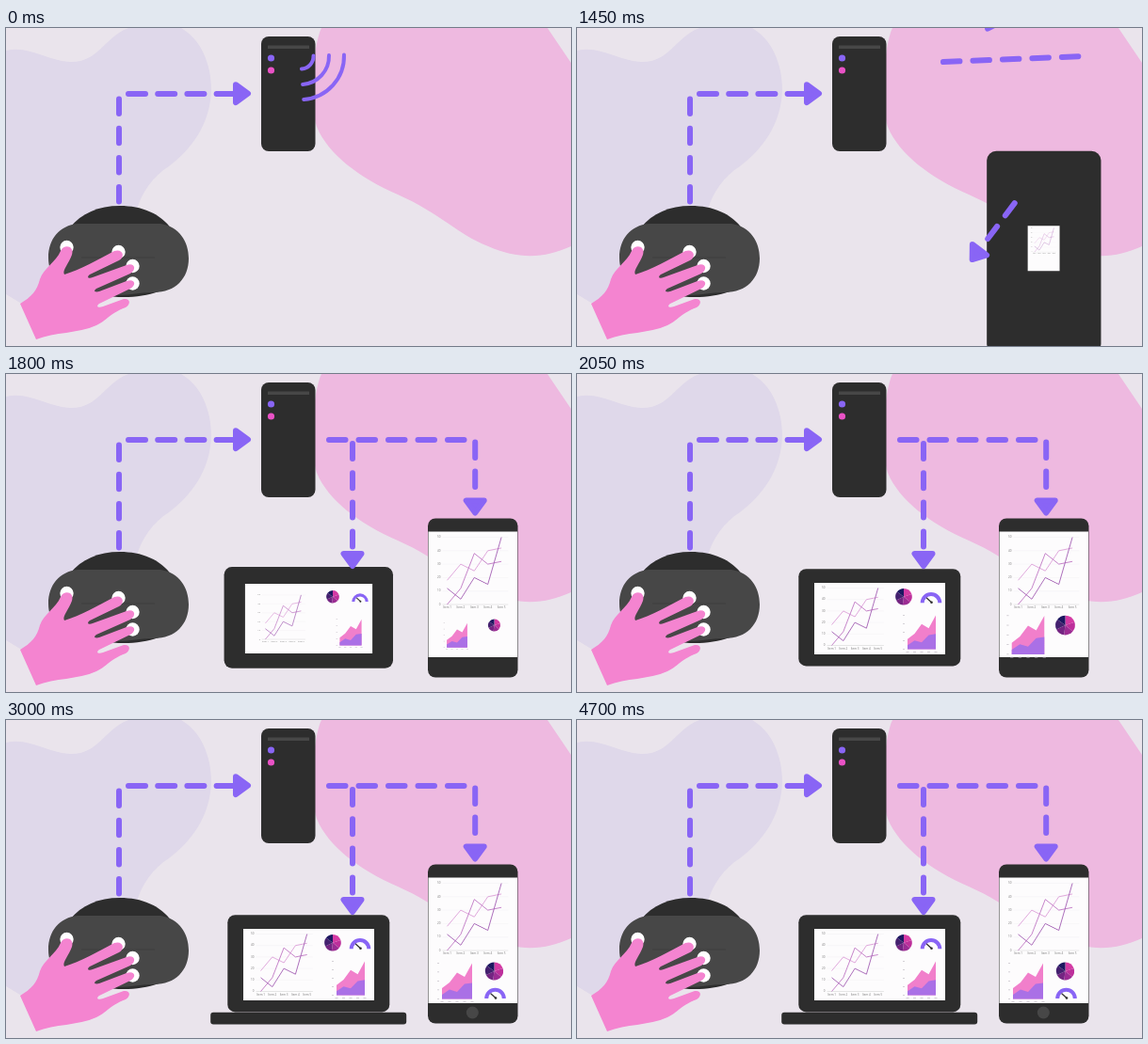
An HTML page with a canvas that plays this animation: 600x338 px, repeating every 4800 ms.

```html
<!DOCTYPE html>
<html lang="en">
<head>
<meta charset="utf-8">
<title>Device data flow</title>
<style>
html, body { margin: 0; width: 100%; height: 100%; overflow: hidden; background: #eae4ec; }
canvas { display: block; width: 600px; height: 338px; }
</style>
</head>
<body>
<canvas id="stage"></canvas>
<script>
const W = 600, H = 338, LOOP = 4800, STEP = 50;
const DARK = '#2d2d2d', GREY = '#474747', PURPLE = '#8965f5', PINK = '#f484d0', WHITE = '#fdfcfd';
const canvas = document.getElementById('stage');
const ctx = canvas.getContext('2d');
const dpr = window.devicePixelRatio || 1;
canvas.width = W * dpr;
canvas.height = H * dpr;

const clamp = v => Math.max(0, Math.min(1, v));
const span = (t, start, length) => clamp((t - start) / length);

// Grows without overshoot.
const grow = (t, start) => 1 - (1 - span(t, start, 385)) ** 3;

// Grows past full size, then settles.
function pop(t, start) {
  if (t < start + 200) return 1.27 * (1 - (1 - span(t, start, 200)) ** 2);
  return 1 + 0.27 * (1 - span(t, start + 200, 250)) ** 2;
}

function fillPath(d, color) {
  ctx.fillStyle = color;
  ctx.fill(new Path2D(d));
}

function box(x, y, w, h, r, color) {
  ctx.beginPath();
  ctx.roundRect(x, y, w, h, r);
  ctx.fillStyle = color;
  ctx.fill();
}

function disc(x, y, r, color) {
  ctx.beginPath();
  ctx.arc(x, y, r, 0, Math.PI * 2);
  ctx.fillStyle = color;
  ctx.fill();
}

function scaled(s, x, y, draw) {
  if (s <= 0) return;
  ctx.save();
  ctx.translate(x, y);
  ctx.scale(s, s);
  ctx.translate(-x, -y);
  draw();
  ctx.restore();
}

function dashes(x1, y1, x2, y2, on, off) {
  ctx.save();
  ctx.strokeStyle = PURPLE;
  ctx.lineWidth = 6;
  ctx.lineCap = 'round';
  ctx.setLineDash([on, off]);
  ctx.beginPath();
  ctx.moveTo(x1, y1);
  ctx.lineTo(x2, y2);
  ctx.stroke();
  ctx.restore();
}

// Arrow head pointing down, turned by an angle about its centre.
function head(x, y, angle = 0) {
  ctx.save();
  ctx.translate(x, y);
  ctx.rotate(angle);
  ctx.beginPath();
  ctx.moveTo(-9.5, -6.5);
  ctx.lineTo(9.5, -6.5);
  ctx.lineTo(0, 6.5);
  ctx.closePath();
  ctx.fillStyle = ctx.strokeStyle = PURPLE;
  ctx.lineWidth = 6;
  ctx.lineJoin = 'round';
  ctx.fill();
  ctx.stroke();
  ctx.restore();
}

// Flies in from an offset while turning upright.
function tumble(t, m, draw) {
  if (t < m.start) return;
  const left = (1 - span(t, m.start, m.end - m.start)) ** 3;
  ctx.save();
  ctx.translate(m.x + m.dx * left, m.y + m.dy * left);
  ctx.rotate(m.turn * left * Math.PI / 180);
  ctx.translate(-m.x, -m.y);
  draw();
  ctx.restore();
}

function background() {
  ctx.fillStyle = '#eae4ec';
  ctx.fillRect(0, 0, W, H);
  fillPath('M0 24C24 18 44 35 68 36C98 37 104 10 130 0H186C207 12 218 38 218 66' +
    'C217 98 201 126 173 147C156 158 144 174 138 196L110 260C70 280 45 300 15 292L0 283Z', '#dfd8ea');
  fillPath('M335 0C326 18 322 80 330 105C342 134 375 159 416 177C463 198 479 219 512 232' +
    'C544 246 572 245 600 232V37L575 0Z', '#eeb9e0');
}

function headset() {
  fillPath('M68 212C80 197 98 189 121 189C144 189 164 197 176 214L188 262' +
    'C177 278 151 286 125 286C95 286 65 278 56 258Z', DARK);
  fillPath('M76 208H164C184 211 194 227 194 245C194 266 180 281 157 281' +
    'C140 281 135 284 118 284C98 284 88 281 78 280C57 277 45 263 45 244C45 224 57 210 76 208Z', GREY);
  ctx.fillStyle = '#3f3f3f';
  ctx.fillRect(80, 243.5, 78, 1);
}

function hand() {
  [[64.5, 233], [119.5, 238], [134.5, 253], [134.5, 271.5]].forEach(([x, y]) => disc(x, y, 7.2, '#fff'));
  fillPath('M15 293C27 286 33 279 36 267C40 255 53 249 58 237C62 229 73 232 70 241' +
    'C67 250 59 258 62 262C79 257 98 246 115 237C124 234 127 243 120 247L89 262' +
    'C85 265 88 267 92 265L128 252C137 249 139 257 132 261L96 277C92 280 95 281 99 280' +
    'L128 269C137 266 139 273 132 277L99 293C95 296 98 298 103 296L125 288' +
    'C132 287 133 293 127 297C109 304 107 311 96 316C76 325 52 323 32 331Z', PINK);
}

function server() {
  box(271, 9, 57.5, 122, 8, DARK);
  box(278, 18.5, 44, 3.5, 0.5, GREY);
  disc(281.5, 32, 3.6, PURPLE);
  disc(281.5, 45, 3.6, '#ea52c6');
}

function waves(t) {
  const alpha = t < 200 ? 1 : 1 - span(t, 150, 450);
  if (!alpha) return;
  ctx.save();
  ctx.globalAlpha = alpha;
  ctx.strokeStyle = PURPLE;
  ctx.lineWidth = 4;
  ctx.lineCap = 'round';
  for (const r of [13.5, 30, 46]) {
    ctx.beginPath();
    ctx.arc(313, 30, r, -0.03, Math.PI / 2 - 0.07);
    ctx.stroke();
  }
  ctx.restore();
}

function label(text, x, y, align) {
  ctx.fillStyle = '#777';
  ctx.font = '3px "Open Sans", sans-serif';
  ctx.textAlign = align;
  ctx.textBaseline = 'middle';
  ctx.fillText(text, x, y);
}

function polyline(points, color, width) {
  ctx.beginPath();
  points.forEach(([x, y]) => ctx.lineTo(x, y));
  ctx.strokeStyle = color;
  ctx.lineWidth = width;
  ctx.stroke();
}

const SERIES = [
  ['#dda0d8', [18, 30, 25, 40, 42]],
  ['#c078c4', [0, 12, 38, 30, 32]],
  ['#a35fb4', [12, 4, 20, 15, 50]]
];

function lineChart(x, y, gap, h) {
  for (let v = 0; v <= 50; v += 10) {
    const py = y - v / 50 * h;
    label(v, x - 7, py, 'right');
    polyline([[x - 5, py], [x + gap * 4.5, py]], v ? '#f1eef2' : '#ccc', 0.5);
  }
  for (let i = 0; i < 5; i++) label('Item ' + (i + 1), x + i * gap, y + 3.5, 'center');
  for (const [color, values] of SERIES) {
    polyline(values.map((v, i) => [x + i * gap, y - v / 50 * h]), color, 0.9);
  }
}

function areaChart(x, y, w, h) {
  const layers = [['#f17fcb', [.3, .46, .74, .62, 1]], ['#aa70e6', [.12, .26, .2, .42, .45]]];
  for (const [color, values] of layers) {
    ctx.beginPath();
    ctx.moveTo(x, y);
    values.forEach((v, i) => ctx.lineTo(x + w * i / 4, y - h * v));
    ctx.lineTo(x + w, y);
    ctx.fillStyle = color;
    ctx.fill();
  }
  ctx.fillStyle = '#c4bfc7';
  for (let i = 0; i < 5; i++) {
    ctx.fillRect(x - 5, y - h * i / 4 - 0.5, 2, 0.7);
    ctx.fillRect(x + w * i / 4 - 1.5, y + 2.5, 3, 0.7);
  }
}

function pie(x, y, r) {
  const slices = [[.2, '#d43aa4'], [.16, '#bd2f9b'], [.16, '#9c2c93'], [.16, '#742482'], [.17, '#44206f'], [.15, '#1d1760']];
  let a = -Math.PI / 2;
  for (const [part, color] of slices) {
    const b = a + part * Math.PI * 2;
    ctx.beginPath();
    ctx.moveTo(x, y);
    ctx.arc(x, y, r, a, b);
    ctx.fillStyle = color;
    ctx.fill();
    a = b;
  }
}

function gauge(x, y) {
  ctx.beginPath();
  ctx.arc(x, y, 9.3, Math.PI, 0);
  ctx.strokeStyle = PURPLE;
  ctx.lineWidth = 4;
  ctx.stroke();
  ctx.lineCap = 'round';
  polyline([[x + 0.5, y - 0.5], [x - 4.5, y - 5]], '#333', 1.3);
  ctx.lineCap = 'butt';
  disc(x + 0.5, y - 0.5, 1.3, '#333');
}

function phone(t) {
  scaled(pop(t, 1250), 495.5, 238, () => box(448, 153.5, 95.5, 169, 8, DARK));
  scaled(grow(t, 1397), 495.5, 234.3, () => {
    box(448.5, 167.5, 94.5, 133.5, 0, WHITE);
    lineChart(468.5, 245, 14.4, 71.5);
  });
  scaled(pop(t, 1736), 479, 278, () => areaChart(463, 296.5, 32, 38));
  scaled(pop(t, 1736), 518.5, 267, () => pie(518.5, 267, 9.6));
  scaled(pop(t, 2060), 519.5, 291, () => gauge(519.5, 296));
  scaled(pop(t, 2100), 495.3, 311, () => disc(495.3, 311, 6.5, GREY));
}

function laptop(t) {
  scaled(pop(t, 1450), 321.3, 258.8, () => box(235.3, 207.2, 172, 103.2, 8, DARK));
  scaled(grow(t, 1531), 321.5, 260, () => box(252, 222, 139, 76, 0, WHITE));
  const s = grow(t, 1650);
  scaled(s, 292, 260, () => lineChart(270.5, 288.5, 12.3, 61));
  scaled(s, 347, 236.7, () => pie(347, 236.7, 8.8));
  scaled(s, 376, 238, () => gauge(376, 243.3));
  scaled(s, 366, 275, () => areaChart(351, 292.5, 30, 36));
  scaled(pop(t, 2150), 321.2, 317.2, () => box(217.2, 310.8, 208, 12.8, 3, DARK));
}

function leftArrow() {
  dashes(120, 75.5, 120, 185, 15.5, 15.7);
  dashes(130, 70, 244, 70, 18, 13.2);
  head(250.5, 69.7, -Math.PI / 2);
}

const ACROSS = { start: 1150, end: 1720, x: 417, y: 70, dx: 432, dy: -348, turn: -22 };
const DOWN = { start: 1150, end: 1800, x: 368, y: 138, dx: 620, dy: -1260, turn: 165 };
const CORNER = { start: 1150, end: 1753, x: 498, y: 110, dx: -441, dy: 835, turn: 291 };

function rightArrows(t) {
  tumble(t, ACROSS, () => dashes(343, 70, 491, 70, 17.5, 14));
  tumble(t, DOWN, () => {
    dashes(368, 74, 368, 190, 16, 15.2);
    head(368, 197.5);
  });
  tumble(t, CORNER, () => {
    dashes(498.2, 72.5, 498.2, 120, 16.5, 14.5);
    head(498.2, 141);
  });
}

function render(time) {
  const t = Math.floor(time / STEP) * STEP;
  ctx.setTransform(dpr, 0, 0, dpr, 0, 0);
  background();
  leftArrow();
  headset();
  hand();
  server();
  waves(t);
  phone(t);
  laptop(t);
  rightArrows(t);
}

function frame() {
  render(performance.now() % LOOP);
  requestAnimationFrame(frame);
}
frame();
</script>
</body>
</html>
```
